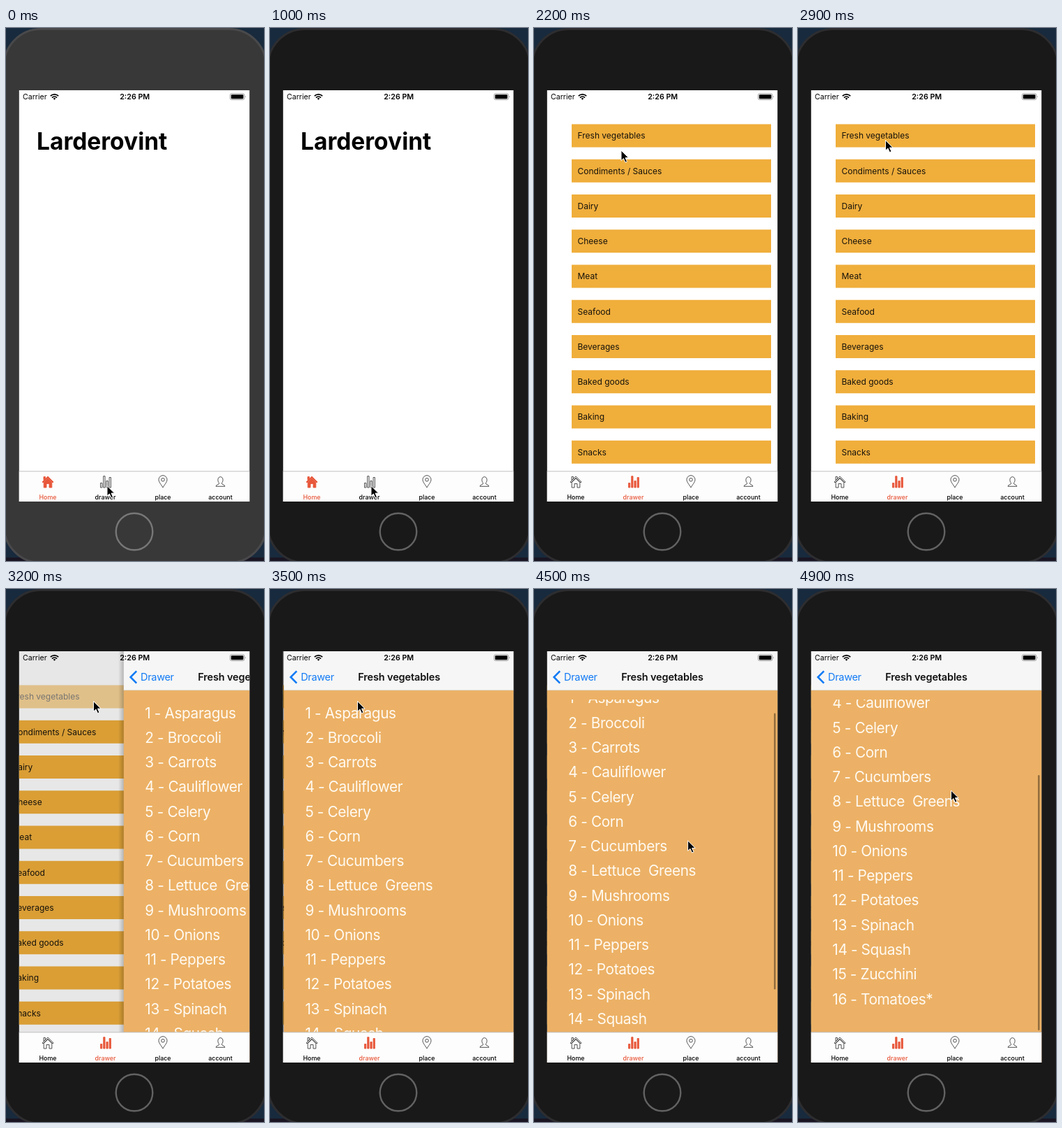
An HTML page that plays this animation: 370 by 762 pixels, repeating every 5000 ms.

```html
<!DOCTYPE html>
<html lang="en">
<head>
<meta charset="utf-8">
<title>Grocery app</title>
<style>
  html, body { margin: 0; width: 100%; height: 100%; overflow: hidden; background: #182a3d; }
  svg { display: block; width: 370px; height: 762px; font-family: Inter, Roboto, sans-serif; }
  text { white-space: pre; }
  .tab text { font-size: 8.9px; font-weight: 500; text-anchor: middle; }
  .tab path { fill: none; stroke: #333; stroke-width: .85; }
  .tab.on text { fill: #e8573a; }
  .tab.on path { fill: #e8573a; stroke: #e8573a; }
  .row text { font-size: 12px; fill: #17130c; }
  .items text { font-size: 20.8px; font-weight: 400; letter-spacing: -.38px; fill: #fffaf2; }
</style>
</head>
<body>
<svg viewBox="0 0 370 762">
  <defs>
    <clipPath id="screen"><path d="M18.8 89h330.4v588H18.8z"/></clipPath>
    <clipPath id="view"><path d="M19 158h330v476H19z"/></clipPath>
    <linearGradient id="shade"><stop stop-opacity="0"/><stop offset="1" stop-opacity=".22"/></linearGradient>
  </defs>

  <path d="M0 757h370v5H0z" fill="#1a1522"/>
  <rect id="body" x="-3" y="1.5" width="376" height="763" rx="53" stroke-width="3"/>
  <circle id="button" cx="184" cy="720" r="26.3" fill="none" stroke-width="2.4"/>

  <g clip-path="url(#screen)">
    <path d="M18 89h332v588H18z" fill="#fff"/>
    <text id="home" x="44" y="174" font-size="33.5" font-weight="700">Larderovint</text>
    <g id="drawer"></g>
    <path id="dim" d="M18 89h332v588H18z"/>
    <g id="detail">
      <path d="M11 89h8v588h-8z" fill="url(#shade)"/>
      <path d="M18.8 89H350v56H18.8z" fill="#f6f6f6"/>
      <path d="M18.8 145H350v532H18.8z" fill="#ecb166"/>
      <path d="M18.8 144.8H350" stroke="#c9b79c" stroke-width=".6"/>
      <path d="M37.2 117.3l-8.6 8.7 8.6 8.7" fill="none" stroke="#137bf5" stroke-width="2.6"/>
      <text x="43" y="131" font-size="14.5" letter-spacing="-.3" fill="#137bf5">Drawer</text>
      <text x="184" y="131" font-size="14.5" letter-spacing="-.15" font-weight="600" text-anchor="middle" fill="#111">Fresh vegetables</text>
      <g clip-path="url(#view)"><g id="items" class="items"></g></g>
      <rect id="bar" x="344" width="2.6" rx="1.3" fill="#000" opacity=".38"/>
    </g>

    <text x="24" y="102" font-size="10.6">Carrier</text>
    <g fill="none" stroke="#000" stroke-width="1.8">
      <path d="M63.8 97.2a8.2 8.2 0 0 1 11.4 0M66 99.6a5 5 0 0 1 7 0"/>
      <path d="M69.5 102.8l-1.9-2a2.8 2.8 0 0 1 3.8 0z" fill="#000" stroke="none"/>
    </g>
    <text x="184.7" y="102" font-size="10.7" font-weight="600" text-anchor="middle">2:26 PM</text>
    <rect x="321.4" y="93.9" width="20.4" height="8.6" rx="2" fill="none" stroke="#888" stroke-width=".8"/>
    <rect x="322.8" y="95.2" width="17.6" height="6" rx="1"/>
    <path d="M343 96.8q1.6 1.4 0 2.8z" fill="#888"/>

    <path d="M18 633.7h332V677H18z" fill="#fdfdfd"/>
    <path d="M18 633.8h332" stroke="#b8b8b8" stroke-width=".9"/>
    <g id="tabs"></g>
  </g>
  <path id="cursor" d="M0 0V14.6L3.4 11.5 6 17.2 8.5 16.1 6 10.6H10.6Z" stroke="#fff" stroke-width="1"/>
</svg>

<script>
const $ = id => document.getElementById(id);
const set = (id, attrs) => {
  for (const key in attrs) $(id).setAttribute(key, attrs[key]);
};
const clamp = (v, lo, hi) => Math.min(hi, Math.max(lo, v));
const ease = (t, from, to) => {
  const p = clamp((t - from) / (to - from), 0, 1);
  return p * p * (3 - 2 * p);
};

const groups = ['Fresh vegetables', 'Condiments / Sauces', 'Dairy', 'Cheese', 'Meat',
  'Seafood', 'Beverages', 'Baked goods', 'Baking', 'Snacks'];
const foods = ['Asparagus', 'Broccoli', 'Carrots', 'Cauliflower', 'Celery', 'Corn',
  'Cucumbers', 'Lettuce  Greens', 'Mushrooms', 'Onions', 'Peppers', 'Potatoes',
  'Spinach', 'Squash', 'Zucchini', 'Tomatoes*'];

// Icons are drawn around the tab centre
const tabs = [
  ['Home', 'M-8 649L0 641 8 649 7 650 0 643.2-7 650ZM-5.8 649.5V657H-2V651.5H2V657H5.8V649.5L0 644ZM-6 646.5V641.5H-3.6V644.3Z'],
  ['drawer', 'M-7 650.5h2.3v6.5h-2.3zM-2.8 640.7h2.3v16.3h-2.3zM1.4 647.5h2.3v9.5h-2.3zM5.6 642.5h2.3v14.5h-2.3z'],
  ['place', 'M0 657C-2 653-6 649.5-6 645.7A6 6 0 0 1 6 645.7C6 649.5 2 653 0 657ZM-2.3 645.8a2.3 2.3 0 1 0 4.6 0a2.3 2.3 0 1 0-4.6 0'],
  ['account', 'M-6.4 655.3C-6.4 652.6-2 653.2-1.8 650.8-4.6 648-4.2 641.7 0 641.7S4.6 648 1.8 650.8C2 653.2 6.4 652.6 6.4 655.3Z']
];

$('drawer').innerHTML = groups.map((name, i) =>
  `<g class="row" transform="translate(0 ${i * 50.25})">
    <rect x="54" y="137.5" width="286" height="33" fill="#f0ae3b"/>
    <text x="62.5" y="158.3">${name}</text></g>`).join('');
$('items').innerHTML = foods.map((name, i) =>
  `<text x="49.3" y="${184.5 + i * 35.27}">${i + 1} - ${name}</text>`).join('');
$('tabs').innerHTML = tabs.map(([name, icon], i) =>
  `<g class="tab" transform="translate(${60 + i * 82.5} 0)">
    <path d="${icon}"/><text y="674">${name}</text></g>`).join('');

const moves = [ // start, end, x, y
  [1500, 2100, 125, 175],
  [2200, 2700, 125.5, 160.5],
  [3600, 4200, 221, 385],
  [4300, 4900, 219.5, 288]
];

function cursorAt(t) {
  let x = 145, y = 654.5;
  for (const [from, to, px, py] of moves) {
    const p = ease(t, from, to);
    x += (px - x) * p;
    y += (py - y) * p;
  }
  return `translate(${x} ${y})`;
}

function draw(t) {
  const lit = t < 1000;
  set('body', { fill: lit ? '#383838' : '#191919', stroke: lit ? '#49494b' : '#2d2d30' });
  set('button', { stroke: lit ? '#777' : '#626262' });

  const tab = t < 1300 ? 0 : 1;
  [...$('tabs').children].forEach((el, i) => el.classList.toggle('on', i === tab));
  set('home', { visibility: tab ? 'hidden' : 'visible' });

  // Push transition: the detail page slides in, the list follows at 30 %
  const slide = Math.min(330, 150 * Math.exp((3200 - t) * 0.0163));
  const pushed = 1 - slide / 330;
  set('drawer', { visibility: tab ? 'visible' : 'hidden', transform: `translate(${-99 * pushed} 0)` });
  set('dim', { opacity: 0.17 * pushed });
  set('detail', { visibility: slide < 330 ? 'visible' : 'hidden', transform: `translate(${slide} 0)` });
  $('drawer').firstElementChild.setAttribute('opacity',
    t < 3100 ? 1 : Math.min(1, 0.2 + (t - 3100) * 0.0033));

  const scroll = Math.max(0, 133.6 * (ease(t, 4300, 4900) - 0.102));
  const over = Math.max(0, scroll - 95) * 1.2;
  set('items', { transform: `translate(0 ${-scroll})` });
  set('bar', {
    y: 161 + 0.79 * Math.min(scroll, 95) + over,
    height: 395 - over,
    visibility: scroll > 0 ? 'visible' : 'hidden'
  });
  set('cursor', { transform: cursorAt(t) });
}

const start = performance.now();
function tick() {
  const t = (performance.now() - start) % 5000;
  draw(Math.floor(t / 100) * 100);
  requestAnimationFrame(tick);
}
tick();
</script>
</body>
</html>
```
